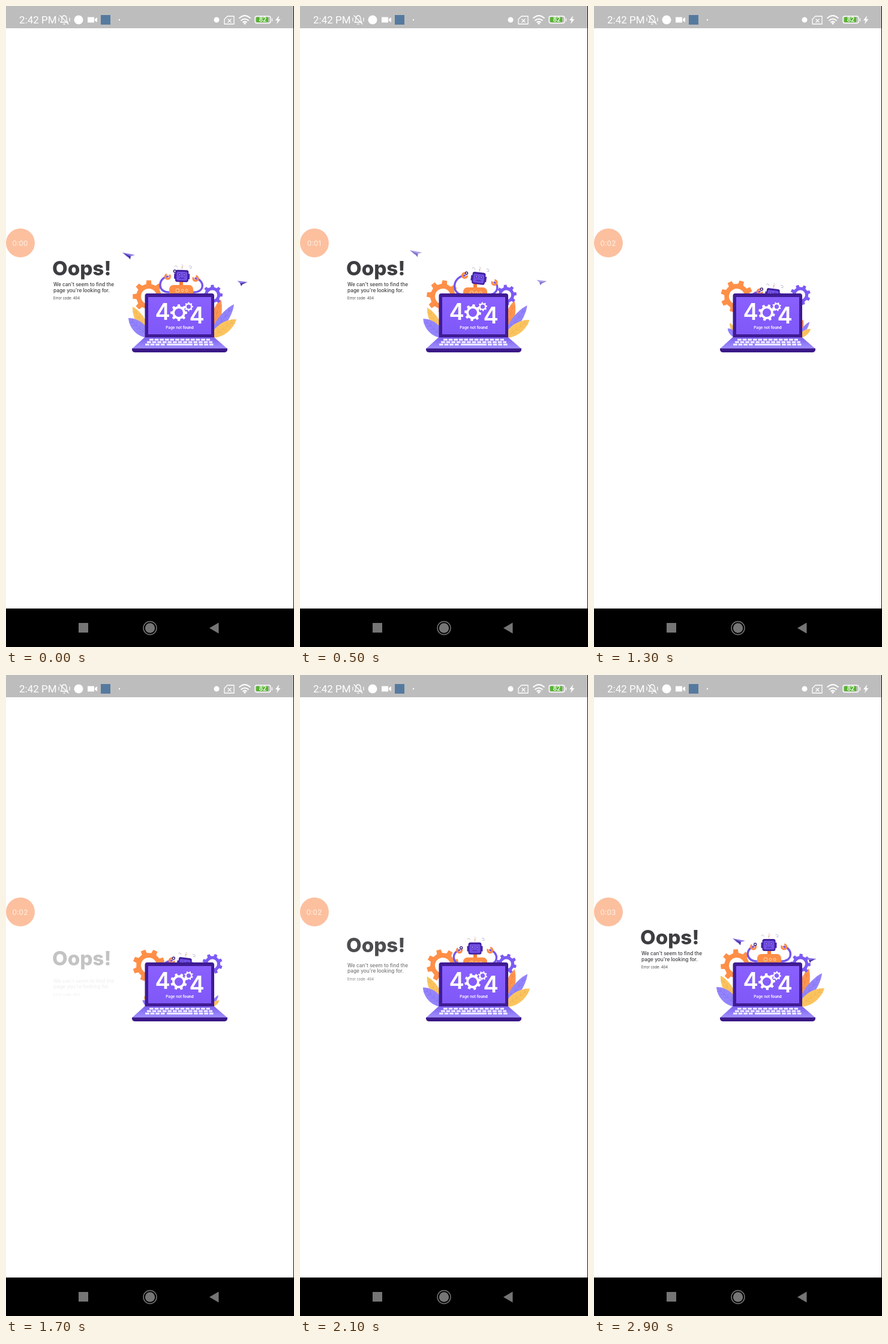
Write an HTML page that moves like this. It is 480 px wide and 1066 px high and loops after 3200 ms.

```html
<!DOCTYPE html>
<html lang="en">
<head>
<meta charset="utf-8">
<title>Page not found</title>
<style>
  html, body { margin: 0; width: 100%; height: 100%; overflow: hidden; background: #fff }
  svg { display: block; width: 480px; height: 1066px; font-family: Inter, Roboto, sans-serif }
</style>
</head>
<body>
<svg viewBox="0 0 480 1066" fill="none">
  <defs>
    <linearGradient id="glass" x2="0" y2="1"><stop stop-color="#8a60ff"/><stop offset="1" stop-color="#8058f8"/></linearGradient>
    <linearGradient id="deck" x2="0" y2="1"><stop stop-color="#7d62ee"/><stop offset="1" stop-color="#a08fff"/></linearGradient>
  </defs>

  <!-- status bar -->
  <path fill="#bdbdbd" d="M0 0H479V37H0z"/>
  <text x="22" y="29" font-family="Roboto, sans-serif" font-size="17" fill="#fff">2:42 PM</text>
  <g stroke="#fff" stroke-width="1.3" stroke-linejoin="round" stroke-linecap="round">
    <path d="M91 27H103L101 24V20Q100 16 97 16T93 20V24zM96 30H98M90 16L104 30M88 20V25M106 20V25"/>
    <path d="M369 17H380V30H364V22zM370 22L375 27M375 22L370 27"/>
    <path d="M389 20Q398 12 407 20M392 24Q398 19 404 24M395 27Q398 24.5 401 27" stroke-width="1.8"/>
    <rect x="415" y="17" width="26" height="11.5" rx="3"/>
    <path d="M443.5 21V25"/>
  </g>
  <g fill="#fff">
    <circle cx="121" cy="23" r="7.5"/>
    <path d="M136 18.500H147V27.500H136zM148 21.500L152 19V27L148 24.500z"/>
    <circle cx="189" cy="23" r="1.200"/>
    <circle cx="351" cy="23" r="4.500"/>
    <circle cx="398" cy="29" r="1.800"/>
    <path d="M455 16L449 24H452.500L451 30L457.500 22H454z"/>
  </g>
  <rect x="158" y="15" width="16" height="16" fill="#567a9f"/>
  <rect x="417" y="18.500" width="20" height="8.500" rx="1.500" fill="#55b52d"/>
  <text x="428" y="26.300" font-size="10" font-weight="600" fill="#fff" text-anchor="middle">82</text>

  <!-- message -->
  <g fill="#3e3e42">
    <text id="oops" x="77" y="448" font-size="33.200" font-weight="800">Oops!</text>
    <g id="info" font-weight="500" font-size="8.300">
      <text x="79" y="466">We can't seem to find the</text>
      <text x="79" y="475.500">page you're looking for.</text>
      <text x="79" y="488.300" font-size="5.900" font-weight="400">Error code: 404</text>
    </g>
  </g>

  <!-- scene behind the laptop -->
  <g id="leavesL"></g>
  <g id="leavesR"></g>
  <path id="gearL" fill="#ff8f47" fill-rule="evenodd"/>
  <path id="gearR" fill="#7c5af5" fill-rule="evenodd"/>
  <g stroke="#7657ee" stroke-width="3.400" stroke-linecap="round">
    <path id="armL"/><path id="armR"/>
  </g>
  <g id="torso">
    <path fill="#f67d38" d="M-3 -6H3V3H-3z"/>
    <rect x="-20" width="40" height="30" rx="7" fill="#ff8f47"/>
    <g stroke="#ffd9a8">
      <circle cx="-6" cy="9" r="3"/><circle cx="2" cy="9" r="2"/><circle cx="9" cy="9" r="2"/>
    </g>
  </g>
  <g id="head">
    <path fill="#4a25b0" d="M-13 -4H13V5H-13z"/>
    <rect x="-11" y="-10" width="22" height="20" rx="3.500" fill="#41209f"/>
    <rect x="-9" y="-7" width="18" height="14.500" rx="2" fill="#7250e6"/>
    <g fill="#b9a8ff" stroke="#41209f"><circle cx="-4" cy="-2" r="1.600"/><circle cx="4" cy="-2" r="1.600"/></g>
    <path stroke="#41209f" d="M-4 4.500L-2 3L0 4.500L2 3L4 4.500"/>
    <path stroke="#b3acc4" stroke-width=".8" d="M0 -11V-14M-13 -15Q-10 -19 -8 -14M-1 -19L2 -17M11 -17Q17 -18 15 -13L12 -14"/>
    <circle cy="-15" r="1" fill="#ff9a5c"/>
  </g>
  <g stroke="#ff8a45" stroke-width="3.200" stroke-dasharray="20 5.130">
    <circle id="handL" r="4"/><circle id="handR" r="4"/>
  </g>
  <circle id="nut" r="2" fill="#fff" stroke="#35207a" stroke-width="1.400"/>
  <g id="planeL">
    <path fill="#8874e6" d="M-10 -5L11 -1L4 1z"/>
    <path fill="#4a2fae" d="M-10 -5L4 1L3 6.500L0 3z"/>
    <path fill="#a899f5" d="M-10 -5L0 3L-3 2z"/>
  </g>
  <g id="planeR">
    <path fill="#8874e6" d="M8.500 -2L-8.500 -4L-4 0z"/>
    <path fill="#4a2fae" d="M8.500 -2L-4 0L-2 5L0 2z"/>
  </g>

  <!-- laptop -->
  <rect x="231.500" y="478" width="115.500" height="76" rx="4" fill="#3f1b94"/>
  <path fill="url(#glass)" d="M237 484H342V546H237z"/>
  <path fill="url(#deck)" d="M231 551H347L369 570H210z"/>
  <path fill="#3a1888" d="M210 569.500H369V572Q368 576 364 576H215Q211 576 210 572z"/>
  <g stroke="#f3f0ff" stroke-width="2.900">
    <path stroke-dasharray="6.800 1.800" d="M239 555H340M235 559H344M232 563H266M313 563H347"/>
    <path d="M268 563H311"/>
  </g>
  <g fill="#fff" font-weight="600">
    <text x="248.500" y="521.500" font-size="38">4</text>
    <text x="305.500" y="528" font-size="38">4</text>
    <text x="289.500" y="536.500" font-size="6.300" text-anchor="middle">Page not <tspan font-weight="700">found</tspan></text>
    <path id="gearBig" fill-rule="evenodd"/>
    <path id="gearSmall" fill-rule="evenodd"/>
  </g>

  <!-- recording bubble -->
  <circle cx="24" cy="394" r="24" fill="#fcc09f"/>
  <text id="clock" x="23.500" y="398.500" font-size="12" fill="#fff0e5" text-anchor="middle"></text>

  <!-- navigation bar -->
  <path fill="#111" d="M479 0H480V1002H479z"/>
  <path fill="#000" d="M0 1002H480V1066H0z"/>
  <path fill="#757575" d="M121 1026H137V1042H121zM339 1034.500L354.500 1025.500V1043.500z"/>
  <circle cx="240" cy="1034.500" r="8.200" fill="#757575"/>
  <circle cx="240" cy="1034.500" r="11" stroke="#757575" stroke-width="1.500"/>
</svg>
<script>
const LOOP = 3200, STEP = 100, LAST = 2900, TURN = 2 * Math.PI;
const $ = id => document.getElementById(id);
const ramp = (t, from, to) => Math.min(1, Math.max(0, (t - from) / (to - from)));
const smooth = (t, from, to) => { const u = ramp(t, from, to); return u * u * (3 - 2 * u); };

function place(id, x, y, angle = 0, scale = 1, alpha = 1) {
  $(id).setAttribute('transform', `translate(${x} ${y}) rotate(${angle}) scale(${scale})`);
  $(id).setAttribute('opacity', alpha);
}

function gear(teeth, outer, hole) {
  const inner = outer * .78, points = [];
  for (let i = 0; i < teeth; i++)
    for (const [shift, r] of [[-.27, inner], [-.18, outer], [.18, outer], [.27, inner]]) {
      const a = (i + shift) / teeth * TURN;
      points.push(`${r * Math.sin(a)} ${-r * Math.cos(a)}`);
    }
  return `M${points.join('L')}zM${-hole} 0a${hole} ${hole} 0 1 0 ${2 * hole} 0a${hole} ${hole} 0 1 0 ${-2 * hole} 0z`;
}

// A leaf growing from the origin to the tip (x, y).
function leaf(x, y, width, fill, vein) {
  const len = Math.hypot(x, y), angle = Math.atan2(x, -y) * 360 / TURN;
  let veins = `M0 0V${-len * .9}`;
  for (let k = .3; k < .85; k += .16)
    veins += `M${-width * .3} ${-len * (k + .1)}L0 ${-len * k}L${width * .3} ${-len * (k + .1)}`;
  return `<g transform="rotate(${angle})">
    <path fill="${fill}" d="M0 0C${-width} ${-len * .35} ${-width * .6} ${-len * .8} 0 ${-len}C${width * .6} ${-len * .8} ${width} ${-len * .35} 0 0z"/>
    <path stroke="${vein}" stroke-width=".6" d="${veins}"/></g>`;
}

const yellow = ['#fcc45f', '#eab455'], violet = ['#9484fb', '#806ff0'], orange = ['#ff9650', '#ea853f'];
$('leavesL').innerHTML = leaf(-29, -52, 13, ...yellow) + leaf(-36, -33, 16, ...violet);
$('leavesR').innerHTML = leaf(18, -64, 14, ...orange) + leaf(40, -56, 13, ...violet) + leaf(44, -31, 15, ...yellow);

const gears = [
  ['gearL', 238, 483, 1, 27, 13],
  ['gearR', 344, 480.5, -1, 17, 8],
  ['gearBig', 288, 510, 1, 14, 7],
  ['gearSmall', 304.5, 500, -1, 7.5, 3.6]
];
for (const [id, , , , outer, hole] of gears) $(id).setAttribute('d', gear(8, outer, hole));

// Text fades out in place, then slides up into view from `start` on.
function slide(id, t, start) {
  const late = t >= start;
  const y = late ? 50 * (1 - ramp(t, start, start + 1200)) ** 2 : 0;
  place(id, 0, y, 0, 1, late ? ramp(t, start, start + 650) : 1 - smooth(t, 700, 1300));
}

// A plane drifts off and fades, then flies out from behind the laptop.
function fly(id, t, x, y, dx, dy, x2, y2, vx, vy) {
  const drift = 1 - (1 - ramp(t, 0, 900)) ** 2, s = (t - 2500) / 400;
  if (t < 2400) place(id, x + dx * drift, y + dy * drift, 0, 1, 1 - smooth(t, 200, 1000));
  else place(id, x2 + vx * s, y2 + vy * s, 0, .7 + .3 * s);
}

function draw(t) {
  slide('oops', t, 1500);
  slide('info', t, 1650);

  for (const [id, x, y, dir] of gears) place(id, x, y, dir * 45 * t / LOOP);

  const grow = 1 - .65 * smooth(t, 300, 1700) * (1 - smooth(t, 1700, 2150));
  place('leavesL', 240, 552, 0, grow);
  place('leavesR', 340, 552, 0, grow);

  // The robot leans to its right, sinks behind the screen and comes back up.
  const sink = 31 * smooth(t, 300, 1200) * (1 - smooth(t, 1700, 2250));
  const lean = smooth(t, -300, 600) * (1 - smooth(t, 1700, 2100));
  const wave = Math.cos(t / 1000 * TURN), torsoY = 464 + sink;
  place('torso', 292, torsoY);
  place('head', 291.5 + 6.5 * lean, 449 + sink, 7 * lean);

  const left = [264 + 2 * wave + 13 * lean, 452 + sink - 8 * lean];
  const right = [320 - 4 * wave, 452 + sink + 4 * lean];
  for (const [side, dir, [x, y]] of [['L', -1, left], ['R', 1, right]]) {
    const bend = 292 + 40 * dir;
    $('arm' + side).setAttribute('d', `M${292 + 18 * dir} ${torsoY + 12}C${bend} ${torsoY + 14} ${bend} ${y + 3} ${x} ${y}`);
    place('hand' + side, x, y, side == 'L' ? -60 * (1 - lean) : -85);
  }
  const toss = 1 - ramp(t, 0, 400);
  place('nut', left[0] + 3 + 9 * toss, left[1] - 4 - 5 * toss);

  fly('planeL', t, 204, 415, -14, -5, 252, 461, -11, -18);
  fly('planeR', t, 394, 461, 11, -2, 341, 483, 21, -9);

  $('clock').textContent = '0:0' + Math.floor((t + 800) / 1000);
}

function frame() {
  const t = performance.now() % LOOP;
  draw(Math.min(LAST, Math.floor(t / STEP) * STEP));
  requestAnimationFrame(frame);
}
frame();
</script>
</body>
</html>
```
